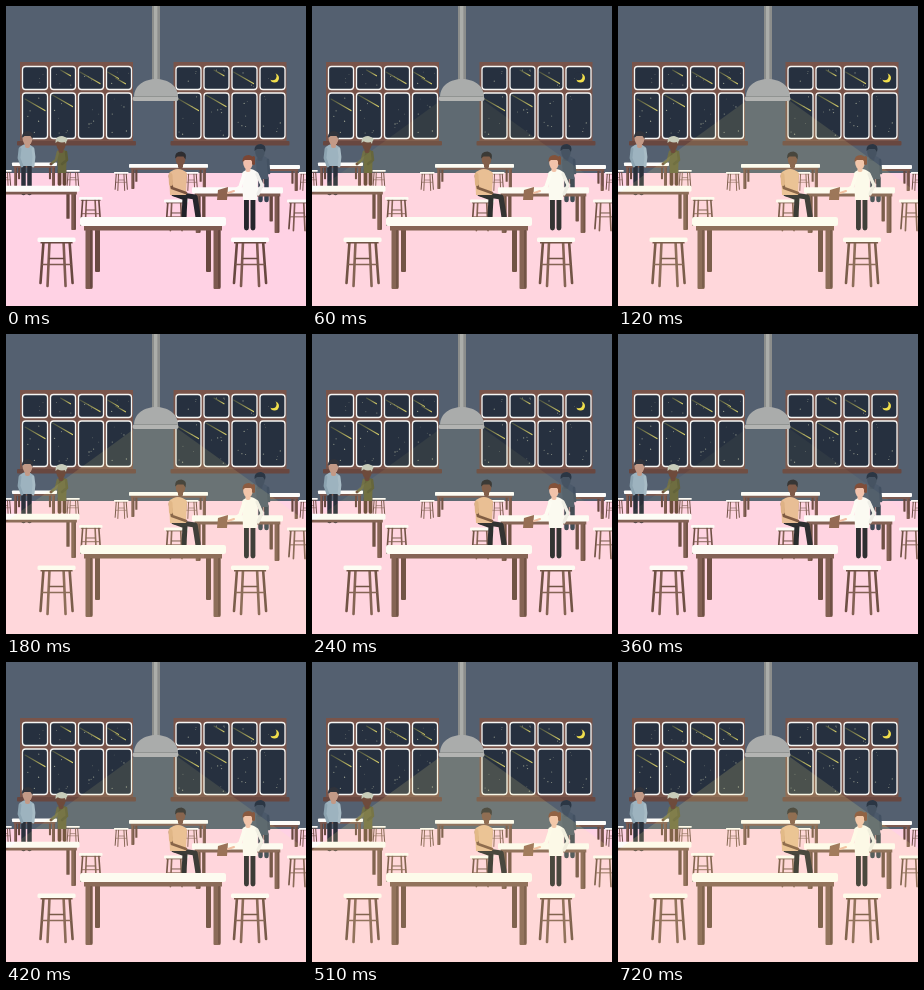
These frames come from a looping animation (300 px wide and 300 px high, 1.02 s). An HTML page with a canvas:

```html
<!DOCTYPE html>
<html lang="en">
<head>
<meta charset="utf-8">
<title>Night canteen</title>
<style>
html, body { margin: 0; width: 100%; height: 100%; overflow: hidden; background: #546070; }
canvas { display: block; width: 100vw; height: 100vh; }
</style>
</head>
<body>
<canvas id="stage"></canvas>
<script>
const stage = document.getElementById('stage');
const scale = Math.max(1, window.devicePixelRatio || 1);
stage.width = stage.height = 300 * scale;
const out = stage.getContext('2d');
const back = document.createElement('canvas');
back.width = back.height = stage.width;
let c = back.getContext('2d');
c.scale(scale, scale);
out.scale(scale, scale);

const WOOD = '#7d5a50', DARK_WOOD = '#684840', TOP = '#fdfcfa';
const NIGHT = '#26303f', INK = '#25262c';

let seed = 7;
function random() {
  seed = seed * 16807 % 2147483647;
  return seed / 2147483647;
}
function box(x, y, w, h, fill, r = 0) {
  c.fillStyle = fill;
  c.beginPath();
  c.roundRect(x, y, w, h, r);
  c.fill();
}
function line(points, width, color) {
  c.strokeStyle = color;
  c.lineWidth = width;
  c.lineCap = c.lineJoin = 'round';
  c.beginPath();
  points.forEach(([x, y]) => c.lineTo(x, y));
  c.stroke();
}
function oval(x, y, rx, ry, fill) {
  c.fillStyle = fill;
  c.beginPath();
  c.ellipse(x, y, rx, ry, 0, 0, 7);
  c.fill();
}
function shape(d, fill) {
  c.fillStyle = fill;
  c.fill(new Path2D(d));
}

function pane(x, y, h) {
  box(x, y, 25, h, NIGHT, 3);
  for (let i = 0; i < h / 8; i++) {
    const r = .35 + random() * .35;
    oval(x + 3 + random() * 19, y + 3 + random() * (h - 6), r, r, '#8d9488');
  }
  c.strokeStyle = '#f6f6f4';
  c.lineWidth = 1.3;
  c.beginPath();
  c.roundRect(x, y, 25, h, 3);
  c.stroke();
}
function streak(x, y, length) {
  const end = [x + length, y + length * .58];
  const g = c.createLinearGradient(x, y, ...end);
  g.addColorStop(0, '#8a8b4560');
  g.addColorStop(1, '#d8d06a');
  line([[x, y], end], 1.1, g);
}
function windowAt(x, streaks) {
  box(x, 56, 113, 79, '#79544a');
  for (let i = 0; i < 4; i++) {
    pane(x + 2.5 + i * 28, 60.5, 23);
    pane(x + 2.5 + i * 28, 87, 45.5);
  }
  // Falling stars: low in the first two panes, high in the others
  for (let i = 0; i < streaks; i++) {
    streak(x + 5 + i * 27.5, i < 2 ? 93 - 4 * i : 66, i < 3 ? 20 : 11);
    if (i % 2) streak(x + 13 + i * 27.5, i < 2 ? 64 : 72, 10);
  }
  box(x - 3, 135, 119, 4.5, '#684740', 1);
}

// Furniture grows with its distance down the floor
function stool(x, y) {
  const w = 14.5 + .36 * (y - 166), s = w / 38, base = y + 1.3 * w;
  for (const side of [-1, 1]) {
    const mid = x + w / 2;
    line([[mid + side * 13 * s, y + 4 * s], [mid + side * 16 * s, base - 4 * s]], 2.6 * s, DARK_WOOD);
    line([[mid + side * 7 * s, y + 4 * s], [mid + side * 9 * s, base - s]], 2.6 * s, WOOD);
  }
  line([[x + 5 * s, y + 27 * s], [x + 33 * s, y + 27 * s]], 1.5 * s, WOOD);
  line([[x + 12 * s, y + 21 * s], [x + 26 * s, y + 21 * s]], 1.5 * s, DARK_WOOD);
  box(x + 3 * s, y + 4 * s, 32 * s, 2 * s, DARK_WOOD);
  box(x, y, w, 4.6 * s, TOP, 1.5 * s);
}
function table(x, w, base) {
  const s = .42 + .0058 * (base - 183);
  const y = base - 25 - .47 * (base - 183);
  for (const left of [x + 15 * s, x + w - 20 * s]) {
    box(left, y + 9 * s, 5 * s, base - y - 26 * s, DARK_WOOD, s);
  }
  box(x + 4 * s, y + 8 * s, w - 8 * s, 5.5 * s, WOOD);
  for (const left of [x + 5.5 * s, x + w - 12.5 * s]) {
    box(left, y + 9 * s, 7 * s, base - y - 9 * s, WOOD, s);
    box(left + 4.5 * s, y + 13 * s, 2.5 * s, base - y - 14 * s, DARK_WOOD, s);
  }
  box(x, y, w, 9 * s, TOP, 2 * s);
}

function torso(x, y, w, h, fill) {
  shape(`M${x} ${y + 4}Q${x + w / 2} ${y - 4} ${x + w} ${y + 4}L${x + w - 1} ${y + h}H${x + 1}Z`, fill);
}
function head(x, y, skin, hair) {
  box(x - 2.5, y + 3, 5, 6, skin, 2);
  oval(x, y, 4.8, 6.3, skin);
  shape(`M${x - 5.5} ${y - 1}Q${x - 6} ${y - 8} ${x + 1} ${y - 8}Q${x + 7} ${y - 7} ${x + 5} ${y}L${x + 3} ${y - 3}H${x - 3}Z`, hair);
}
function legs(x, y, gap, h, color) {
  for (const side of [-1, 1]) {
    line([[x + side * gap / 2, y], [x + side * gap / 2, y + h]], gap * .75, color);
  }
}

function standingPair() {
  legs(20.5, 160, 6, 27, '#2a303b');
  torso(13, 138, 15, 22, '#9db3bf');
  line([[14, 143], [13, 152], [16, 160]], 2.8, '#8ca3b0');
  line([[27, 143], [28, 151], [27, 160]], 2.8, '#a8bcc6');
  head(21.5, 133, '#c39a87', '#30333b');

  legs(56, 164, 5, 14, '#654536');
  torso(51, 143, 10, 24, '#67663c');
  line([[52, 146], [50, 154], [45, 158]], 2.7, '#717047');
  line([[60, 146], [61, 154], [56, 158]], 2.5, '#5c5c36');
  oval(45, 158, 1.3, 1.3, '#704c3a');
  head(55, 138, '#6e4b3c', '#c7ccba');
  oval(56, 133.5, 5.5, 3, '#c7ccba');
}
function sitter() {
  line([[168, 188], [179, 192], [178, 210]], 5, '#1f2228');
  line([[169, 188], [189, 191], [192, 210]], 5.3, INK);
  torso(163, 163, 18, 26, '#e7bb94');
  head(174.5, 153.5, '#7a5445', '#2e2d30');
  line([[164, 170], [166, 182], [180, 187]], 2.8, '#79533f');
  line([[164.5, 169], [165, 178]], 4, '#dcae84');
}
function shadowMan() {
  legs(257.5, 172, 6, 22, '#354150');
  torso(250, 150, 13, 23, '#4b596a');
  line([[262, 154], [263, 167]], 2.6, '#435162');
  head(254, 146, '#465362', '#2b3644');
}
function waiter() {
  legs(243.7, 191, 6.5, 31, INK);
  torso(236, 163, 16, 31, '#fbfaf6');
  line([[251, 168], [256, 179], [252, 188]], 3.3, '#eeedea');
  head(242, 157, '#f0bfac', '#7b4634');
  box(246, 150, 3, 9, '#7b4634', 1.5);
  shape('M212 184L222 181L221 194L211 194Z', '#8f6450');
  line([[238, 169], [234, 181], [228, 185]], 3.6, '#fdfcf8');
  line([[228, 185], [222, 187]], 2, '#efbaa4');
}

function paintRoom() {
  box(0, 0, 300, 168, '#546070');
  box(0, 167, 300, 133, '#ffd2e4');
  windowAt(14, 4);
  windowAt(167.5, 3);
  oval(268.5, 72, 4.5, 4.5, '#f1df4c');
  oval(266.5, 70.3, 4, 4, NIGHT);

  table(6, 45, 180);
  for (const x of [-8, 60]) stool(x, 164);
  standingPair();
  table(123, 79, 183);
  table(251, 43, 185);
  for (const x of [108, 178, 293]) stool(x, 166);
  shadowMan();
  table(-25, 98.5, 224);
  for (const x of [73, 158, 281]) stool(x, x < 100 ? 191 : 193.5);
  table(186, 91, 227);
  sitter();
  waiter();
  table(74, 146, 283);
  for (const x of [31.5, 225]) stool(x, 231.5);
}

function paintLamp() {
  box(146, 0, 8, 75, '#8c8e8c');
  box(148, 0, 3.4, 75, '#abada9');
  shape('M128 91C128 67 172 67 172 91Z', '#aaacab');
  box(126.5, 90.5, 46, 4.5, '#b3b4b2', 2);
  line([[128, 90.5], [171, 90.5]], .7, '#868887');
}

// A short pulse, then a rise to full light that holds
function glowAt(t) {
  const swell = u => Math.sin(Math.PI * u) ** 1.4;
  return t < 300 ? .8 * swell(t / 300) : swell(Math.min(.5, (t - 300) / 480));
}

paintRoom();
c = out;
const start = performance.now();
function tick() {
  const now = performance.now() - start;
  const t = Math.floor((now % 1020) / 30) * 30;
  c.drawImage(back, 0, 0, 300, 300);
  c.globalAlpha = glowAt(t) * .17;
  shape('M128 95H172L300 187V300H0V188Z', '#fff296');
  c.globalAlpha = 1;
  paintLamp();
  requestAnimationFrame(tick);
}
tick();
</script>
</body>
</html>
```
